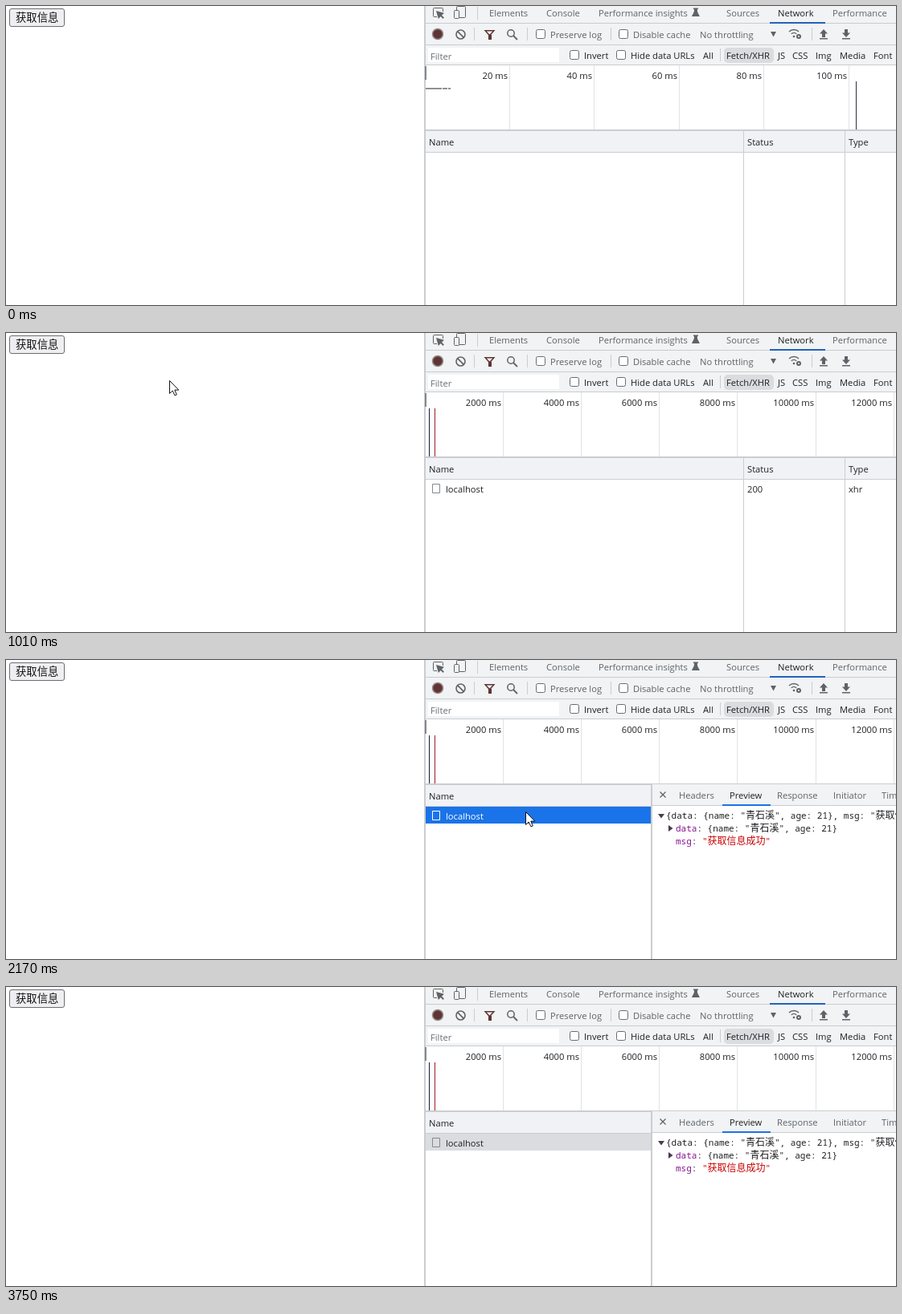
Write an HTML page with a canvas that moves like this. It is 1107 px wide and 373 px high and loops after 3820 ms.

```html
<!DOCTYPE html>
<html lang="zh">
<head>
<meta charset="utf-8">
<title>Network panel</title>
<style>
html, body { margin: 0; width: 100%; height: 100%; overflow: hidden; background: #fff; }
canvas { display: block; }
</style>
</head>
<body>
<canvas id="stage" width="1107" height="373"></canvas>
<script>
const canvas = document.getElementById('stage');
const ctx = canvas.getContext('2d');
const W = canvas.width, H = canvas.height;
const LOOP = 3820, STEP = 70;
const CJK = '"Noto Sans CJK SC", "Noto Sans CJK", sans-serif';
const UI = '11.2px "Open Sans", "Noto Sans", sans-serif';
const MONO = '11px "Noto Sans Mono", "DejaVu Sans Mono", monospace';
const GRAY = '#5f6368', DARK = '#202124', LINE = '#cacdd1', BAR = '#f1f3f4';
const BLUE = '#1a73e8', MAROON = '#5e3434', PURPLE = '#881391', RED = '#c80000';
const USER = '青石溪';

// Panel edges
const LEFT = 522, SPLIT = 802, STATUS = 917, TYPE = 1043;

// Pointer stops
const OUTSIDE = { x: 1275, y: 441 }, PAGE_TOP = { x: 164, y: 0 };
const ON_BUTTON = { x: 45, y: 13 }, NEAR_ROW = { x: 635, y: 184 };
const ON_ROW = { x: 646, y: 189 }, EXIT = { x: 1091, y: 354 };

// Stepped ease-out from a to b, holding at b afterwards
function glide(t, start, end, a, b, power) {
  const n = Math.round((end - start) / STEP);
  const step = Math.min(n, Math.floor((t - start) / (end - start) * n) + 1);
  const k = 1 - (1 - step / n) ** power;
  const mix = (p, q) => Math.round(p + (q - p) * k);
  return { x: mix(a.x, b.x), y: mix(a.y, b.y) };
}

function pointerAt(t) {
  if (t < 70 || (t >= 270 && t < 540) || t >= 3480) return null;
  if (t < 270) return glide(t, 70, 270, OUTSIDE, PAGE_TOP, 1);
  if (t < 880) return ON_BUTTON;
  if (t < 1630) return glide(t, 880, 1560, ON_BUTTON, NEAR_ROW, 1.4);
  if (t < 2560) return glide(t, 1630, 1960, NEAR_ROW, ON_ROW, 1);
  return glide(t, 2560, 3480, ON_ROW, EXIT, 2.2);
}

function rect(x, y, w, h, color) {
  ctx.fillStyle = color;
  ctx.fillRect(x, y, w, h);
}

function text(s, x, y, color = DARK, font = UI, align = 'left') {
  ctx.font = font;
  ctx.fillStyle = color;
  ctx.textAlign = align;
  ctx.fillText(s, x, y);
  return ctx.measureText(s).width;
}

// Labels one after another with an even gap; returns the next free x
function labels(words, x, y, gap, color) {
  for (const word of words) {
    x += text(word, Math.round(x), y, word === 'Network' || word === 'Preview' ? DARK : color) + gap;
  }
  return x;
}

function stroke(color, width = 1) {
  ctx.strokeStyle = color;
  ctx.lineWidth = width;
  ctx.stroke();
}

function line(x0, y0, x1, y1, color, width) {
  ctx.beginPath();
  ctx.moveTo(x0, y0);
  ctx.lineTo(x1, y1);
  stroke(color, width);
}

function disc(x, y, r, fill, border, width) {
  ctx.beginPath();
  ctx.arc(x, y, r, 0, Math.PI * 2);
  if (fill) {
    ctx.fillStyle = fill;
    ctx.fill();
  }
  if (border) stroke(border, width);
}

// Isosceles triangle: tip, half base, height, quarter turns (0 points up)
function triangle(x, y, half, height, turns, color) {
  ctx.save();
  ctx.translate(x, y);
  ctx.rotate(turns * Math.PI / 2);
  ctx.beginPath();
  ctx.moveTo(0, 0);
  ctx.lineTo(half, height);
  ctx.lineTo(-half, height);
  ctx.fillStyle = color;
  ctx.fill();
  ctx.restore();
}

function box(x, y, w, h, r, fill, border) {
  ctx.beginPath();
  ctx.roundRect(x, y, w, h, r);
  if (fill) {
    ctx.fillStyle = fill;
    ctx.fill();
  }
  if (border) stroke(border);
}

function check(label, x, y, color) {
  box(x + .5, y + .5, 11, 11, 2, '#fff', '#6b6b70');
  text(label, x + 18, y + 11, color);
}

function bar(y, h) {
  rect(LEFT, y, W - LEFT, h, BAR);
  rect(LEFT, y + h, W - LEFT, 1, LINE);
}

const separator = (x, y) => rect(x, y, 1, 16, LINE);

// Monospace line whose Chinese parts use their own face
function code(s, x, y, color) {
  for (const part of s.match(/[\u4e00-\u9fff]+|[^\u4e00-\u9fff]+/g)) {
    x += text(part, x, y, color, part > '\u4e00' ? '12px ' + CJK : MONO);
  }
  return x;
}

function drawButton(t, p) {
  const hover = p && p.x < 73 && p.y < 26;
  const pressed = t >= 810 && t < 880;
  const fill = pressed ? '#f5f5f7' : hover ? '#e1e1e5' : '#efeff2';
  box(4.5, 3.5, 68, 22, 2.5, fill, hover ? '#4c4c50' : '#6c6c72');
  text('获取信息', 12, 19, '#111', '13.33px ' + CJK);
}

function drawTabs() {
  bar(0, 21);
  box(531.5, 2.5, 12, 11, 1, null, GRAY);
  rect(536, 7, 9, 9, BAR);
  ctx.save();
  ctx.translate(535, 6);
  ctx.rotate(-Math.PI / 4);
  triangle(0, 0, 5, 9, 0, GRAY);
  rect(-1, 8, 2, 5, GRAY);
  ctx.restore();
  box(560.5, .5, 11, 14, 1, BAR, GRAY);
  box(557.5, 5.5, 6, 10, 1, BAR, GRAY);
  separator(586, 1);
  const flask = labels(['Elements', 'Console', 'Performance insights'], 601, 13, 23, GRAY) - 13;
  rect(flask - 3, 2.5, 6, 1.5, GRAY);
  rect(flask - 2, 3, 4, 5, GRAY);
  triangle(flask, 3, 5, 10, 0, GRAY);
  labels(['Sources', 'Network', 'Performance'], 896, 13, 23, GRAY);
  rect(950, 20, 69, 2, '#2462bd');
}

function drawWifi(x, y) {
  for (const r of [4.5, 8.5]) {
    ctx.beginPath();
    ctx.arc(x, y, r, -Math.PI * .75, -Math.PI * .25);
    stroke(GRAY, 1.4);
  }
  disc(x, y, 1.3, GRAY);
  disc(x + 6, y, 3.8, BAR);
  disc(x + 6, y, 2, null, GRAY, 2);
}

// Arrow over a base line, dir -1 up or 1 down
function drawArrow(x, dir) {
  triangle(x, 34 + dir * 5, 5, 5.5, dir + 1, GRAY);
  rect(x - 2, dir < 0 ? 34 : 29, 4, 5, GRAY);
  rect(x - 5, 40, 10, 1.5, GRAY);
}

function drawToolbar() {
  bar(22, 26);
  disc(537, 35, 6.5, MAROON, '#988888', 1.5);
  disc(565.5, 35.5, 5.5, null, GRAY, 1.6);
  line(561.6, 31.6, 569.4, 39.4, GRAY, 1.6);
  separator(582, 27);
  triangle(601.5, 38, 7, 8, 2, MAROON);
  triangle(601.5, 35.5, 3.8, 4, 2, BAR);
  rect(600, 36, 4, 6, MAROON);
  disc(628, 34, 4.2, null, GRAY, 1.5);
  line(631, 37, 636, 42, GRAY, 1.8);
  separator(648, 27);
  check('Preserve log', 659, 29, GRAY);
  separator(752, 27);
  check('Disable cache', 762, 29, GRAY);
  text('No throttling', 863, 40, GRAY);
  triangle(954.5, 38.5, 3.5, 6.5, 2, GRAY);
  drawWifi(980, 38);
  separator(1002, 27);
  drawArrow(1017, -1);
  drawArrow(1045, 1);
}

function drawFilters() {
  bar(49, 24);
  rect(525, 52, 163, 18, '#fff');
  text('Filter', 528, 66.5, '#6b6f74');
  check('Invert', 701, 55);
  check('Hide data URLs', 759, 55);
  text('All', 867, 66);
  separator(888, 53);
  box(893, 52, 62, 19, 5, '#dadce0');
  labels(['Fetch/XHR', 'JS', 'CSS', 'Img', 'Media', 'Font'], 896, 66, 9.7, DARK);
}

function drawTimeline(loaded) {
  const unit = loaded ? 2000 : 20;
  const gap = loaded ? 97.2 : 105.4;
  for (let i = 1; LEFT + gap * i < W; i++) {
    const x = Math.floor(LEFT - 1 + gap * i);
    rect(x, 74, 1, 80, '#e1e2e4');
    text(i * unit + ' ms', x - 2, 91, DARK, UI, 'right');
  }
  if (loaded) {
    rect(526, 94, 1, 60, '#171744');
    rect(533, 94, 1, 60, '#a0182c');
  } else {
    rect(LEFT, 102, 31, 2, '#8f918f');
    rect(542, 102, 1, 2, '#fff');
    rect(549, 102, 1, 2, '#fff');
    rect(1057, 94, 1, 60, '#33303a');
  }
  rect(LEFT - 1, 154, W - LEFT + 1, 2, LINE);
}

function drawRow(t, p, open) {
  const selected = open && t < 3750;
  const hover = p && p.x >= LEFT && p.y >= 180;
  if (open) rect(LEFT, 183, SPLIT - LEFT, 21, selected ? BLUE : '#dadce0');
  else if (hover) rect(LEFT, 183, W - LEFT, 21, '#eff5fd');
  box(530.5, 188.5, 9, 11, 0, null, selected ? '#fff' : '#85898f');
  text('localhost', 547, 199, selected ? '#fff' : DARK);
}

function drawTable(t, p, loaded, open) {
  rect(LEFT, 156, W - LEFT, 26, '#f1f2f5');
  rect(LEFT, 182, W - LEFT, 1, LINE);
  text('Name', LEFT + 4, 174);
  if (loaded) drawRow(t, p, open);
  if (open) return;
  for (const [x, head, value] of [[STATUS, 'Status', '200'], [TYPE, 'Type', 'xhr']]) {
    rect(x, 156, 1, H - 156, LINE);
    text(head, x + 5, 174);
    if (loaded) text(value, x + 5, 199);
  }
}

function drawPreview(t) {
  rect(SPLIT, 155, W - SPLIT, H - 155, '#fff');
  rect(SPLIT, 155, W - SPLIT, 26, BAR);
  rect(SPLIT, 181, W - SPLIT, 1, LINE);
  rect(SPLIT, 155, 2, H - 155, LINE);
  line(813.5, 164.5, 820.5, 171.5, GRAY, 1.3);
  line(820.5, 164.5, 813.5, 171.5, GRAY, 1.3);
  labels(['Headers', 'Preview', 'Response', 'Initiator', 'Timing'], 837, 173, 19, GRAY);
  rect(891, 180, 60, 2, BLUE);
  if (t < 2170) return;
  const person = `{name: "${USER}", age: 21}`;
  const message = '"获取信息成功"';
  triangle(815, 197.5, 4, 5.5, 2, '#4a3b4d');
  triangle(829.5, 210, 4, 5.5, 1, '#4a3b4d');
  code(`{data: ${person}, msg: ${message}}`, 821, 198, DARK);
  code(': ' + person, code('data', 833, 214, PURPLE), 214, DARK);
  code(message, code(': ', code('msg', 833, 230, PURPLE), 230, DARK), 230, RED);
}

function drawPointer({ x, y }) {
  ctx.save();
  ctx.translate(x + .5, y + .5);
  const arrow = new Path2D('M0 0V16L3.7 12.6 6.5 18.4 8.8 17.4 6.3 11.6H11.3Z');
  ctx.fillStyle = '#fff';
  ctx.fill(arrow);
  ctx.strokeStyle = '#111';
  ctx.lineWidth = 1;
  ctx.stroke(arrow);
  ctx.restore();
}

function draw(t) {
  const p = pointerAt(t);
  const loaded = t >= 880;
  const open = t >= 2100;
  rect(0, 0, W, H, '#fff');
  drawButton(t, p);
  drawTabs();
  drawToolbar();
  drawFilters();
  drawTimeline(loaded);
  drawTable(t, p, loaded, open);
  if (open) drawPreview(t);
  rect(LEFT - 2, 0, 2, H, LINE);
  rect(LEFT - 1, 75, 2, 17, '#85878b');
  if (p) drawPointer(p);
}

const start = performance.now();
function tick() {
  draw((performance.now() - start) % LOOP);
  requestAnimationFrame(tick);
}
tick();
</script>
</body>
</html>
```
